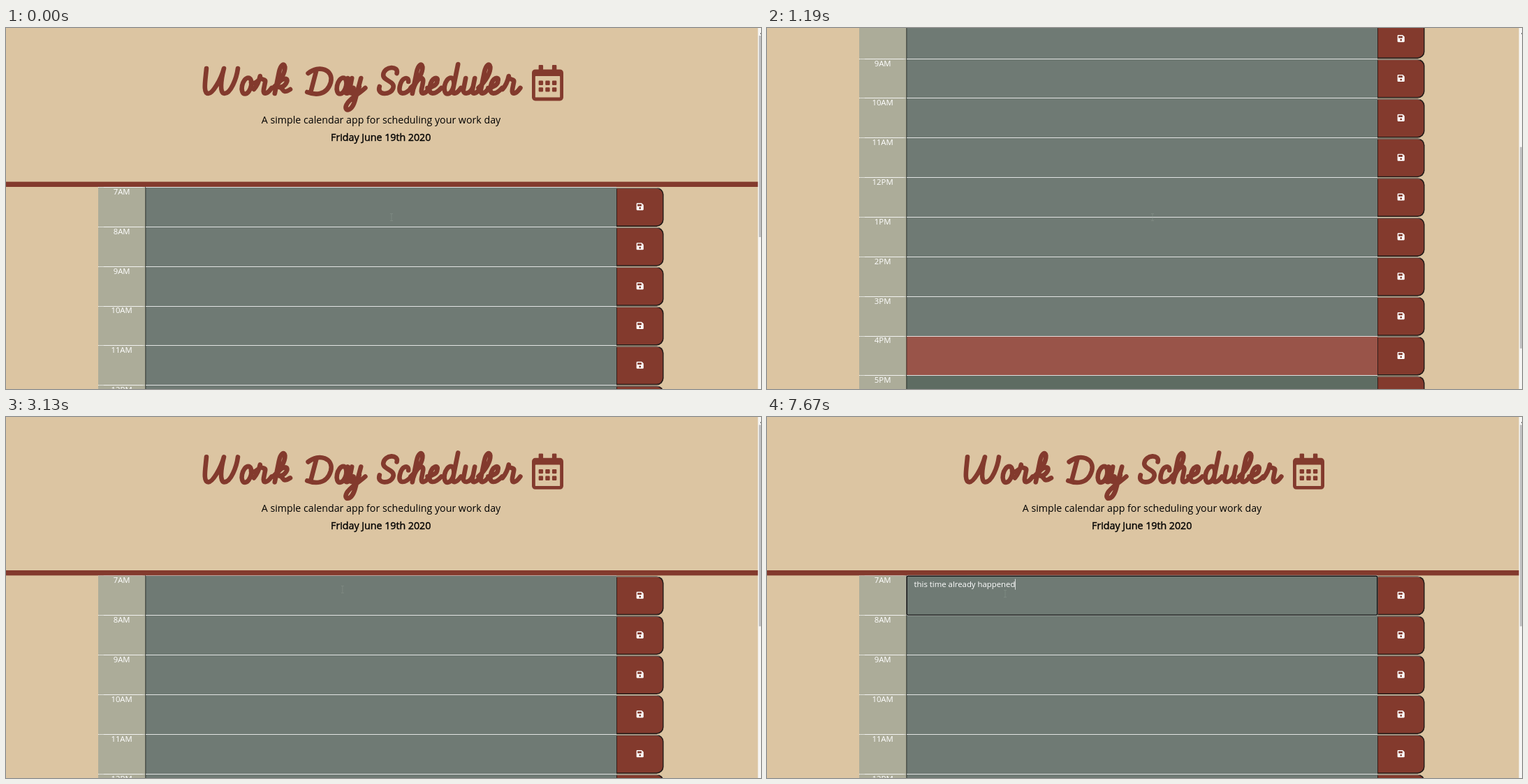
These frames come from a looping animation (1081x518 px, 8 s). An HTML page with a canvas:

```html
<!DOCTYPE html>
<html lang="en">
<head>
<meta charset="utf-8">
<title>Work Day Scheduler</title>
<style>
html, body { margin: 0; width: 100%; height: 100%; overflow: hidden; background: #dcc5a2; }
canvas { display: block; width: 1081px; height: 518px; }
</style>
</head>
<body>
<canvas id="stage" role="img" aria-label="Work Day Scheduler"></canvas>
<script>
const W = 1081, H = 518, LOOP = 8000;
const ROW = 56.85, TOP = 228.5, ROWS = 13, CURRENT = 9;
const RUST = '#833a2d', SAND = '#dcc5a2';
const NOTE = 'this time already happened';
const FOCUS = 3940;
const canvas = document.getElementById('stage');
const ctx = canvas.getContext('2d');
const dpr = window.devicePixelRatio || 1;
canvas.width = W * dpr;
canvas.height = H * dpr;

const STEP = 137.5;
const bursts = [[500, 1460], [1860, 1980], [2720, 3690], [3810, 4080],
  [4510, 5480], [5630, 6030], [6450, 7120], [7530, 7670]];

function snap(t) {
  const burst = bursts.findLast(b => b[0] <= t);
  if (!burst) return 0;
  const [start, end] = burst;
  const step = (end - start) / Math.round((end - start) / STEP);
  return Math.min(end, start + Math.floor((t - start + 12) / step) * step);
}

// Linear motion through [time, value] points, held at both ends.
function along(t, ...points) {
  const i = points.findIndex(p => p[0] > t);
  if (i === 0) return points[0][1];
  if (i < 0) return points.at(-1)[1];
  const [[t0, a], [t1, b]] = [points[i - 1], points[i]];
  return a + (b - a) * (t - t0) / (t1 - t0);
}

const scrollAt = t => along(t, [478, 0], [1322, 355.5], [1780, 355.5], [1980, 427.4], [2600, 427.4], [3130, 0.6]);
const typedAt = t => Math.ceil(along(t, [4340, 0], [5480, 12], [6030, 18], [6316, 18], [7120, 25], [7670, 26]));
const pointerAt = t => [
  along(t, [2720, 552], [3130, 483], [3810, 341]),
  along(t, [2720, 271], [3130, 247], [3810, 253])
];

// Script lettering from a few shared pen strokes, slanted as a whole.
const SLANT = 0.2;
const flick = x => `C${x} -2 ${x + 6} -2 ${x + 11} -12`;
const stem = (x, top) => `M${x} ${top}V-10${flick(x)}`;
const bowl = 'M16 -15a6.5 11.5 0 1 0 -13 0a6.5 11.5 0 1 0 13 0';
const cup = 'M3 -26V-10C3 -2 14 -2 16 -14';
const curl = 'C13 -29 3 -28 3 -14C3 -1 13 -2 20 -12';
const loop = 'M0 -12C9 -22 13 -34 11 -42C9 -48 4 -46 4 -34V-10';

// Each letter has its advance and its strokes.
const glyphs = {
  W: [51, 'M-2 -40C0 -22 0 -4 8 -4C14 -4 22 -24 23 -40C22 -22 24 -4 31 -4C40 -4 44 -26 43 -40'],
  D: [41, 'M3 -6C14 -2 32 0 34 -20C35 -38 12 -46 -1 -33M10 -38L8 -5'],
  S: [29, 'M24 -33C25 -44 4 -44 5 -31C6 -22 24 -22 23 -12C22 -1 1 -1 3 -14'],
  a: [19, bowl + stem(16, -26)],
  c: [19, 'M14 -21' + curl],
  d: [28, bowl + stem(16, -46)],
  e: [21, 'M0 -12C8 -13 13 -17 12 -22' + curl],
  h: [24, loop + 'V-4M4 -10C6 -28 16 -30 16 -20' + stem(16, -20)],
  k: [28, loop + 'V-4M4 -14C8 -28 22 -28 17 -18C15 -14 11 -13 9 -13C16 -12 14 -2 25 -10'],
  l: [14, loop + flick(4)],
  o: [21, bowl + 'M15 -20Q20 -17 24 -22'],
  r: [27, 'M0 -10Q5 -18 5 -29C6 -22 14 -26 14 -21' + stem(14, -21)],
  u: [24, cup + stem(16, -26)],
  y: [24, cup + 'M16 -26L14 4C13 24 0 22 3 12C5 4 16 -2 25 -12']
};

function lettering() {
  const path = new Path2D();
  for (const [word, left] of [['Work', 281], ['Day', 427], ['Scheduler', 529]]) {
    let x = left;
    for (const ch of word) {
      const [advance, strokes] = glyphs[ch];
      path.addPath(new Path2D(strokes), new DOMMatrix([1, 0, -SLANT, 1, x, 0]));
      x += advance;
    }
  }
  return path;
}

function calendarIcon() {
  const p = new Path2D();
  p.roundRect(0, 64, 448, 448, 48);
  p.roundRect(48, 160, 352, 304, 6);
  for (const x of [96, 288]) p.roundRect(x, 0, 64, 64, [12, 12, 0, 0]);
  for (const y of [224, 320])
    for (const x of [96, 192, 288]) p.roundRect(x, y, 64, 64, 12);
  return p;
}

function saveIcon() {
  const p = new Path2D('M434 130 350 46Q336 32 316 32H48Q0 32 0 80V432Q0 480 48 480H400Q448 480 448 432V164Q448 144 434 130Z');
  p.roundRect(64, 96, 256, 128, 12);
  p.moveTo(288, 352);
  p.arc(224, 352, 64, 0, 7);
  return p;
}

const title = lettering(), calendar = calendarIcon(), disk = saveIcon();

function rect(x, y, w, h, color) {
  ctx.fillStyle = color;
  ctx.fillRect(x, y, w, h);
}

function box(x, y, w, h, r) {
  ctx.beginPath();
  ctx.roundRect(x, y, w, h, r);
}

function outline(color, width) {
  ctx.strokeStyle = color;
  ctx.lineWidth = width;
  ctx.stroke();
}

function text(str, x, y, size, color, align = 'center') {
  ctx.font = `400 ${size}px "Open Sans", sans-serif`;
  ctx.textAlign = align;
  ctx.fillStyle = color;
  ctx.fillText(str, x, y);
}

function icon(path, x, y, scale, color) {
  ctx.save();
  ctx.translate(x, y);
  ctx.scale(scale, scale);
  ctx.fillStyle = color;
  ctx.fill(path, 'evenodd');
  ctx.restore();
}

function header() {
  ctx.save();
  ctx.translate(0, 98);
  ctx.strokeStyle = RUST;
  ctx.lineWidth = 6.6;
  ctx.lineCap = ctx.lineJoin = 'round';
  ctx.stroke(title);
  ctx.restore();
  icon(calendar, 753, 53, 0.1004, RUST);
  text('A simple calendar app for scheduling your work day', 537, 136.5, 14.21, '#000');
  const date = 'Friday June 19th 2020';
  text(date, 536.7, 162, 14.21, '#000');
  ctx.strokeStyle = '#000';
  ctx.lineWidth = 0.4;
  ctx.strokeText(date, 536.7, 162);
  rect(0, 220.6, 1077, 7.4, RUST);
}

function button(y) {
  const h = ROW - 0.9;
  box(874, y, 67.6, h, [0, 10, 10, 0]);
  ctx.fillStyle = '#211a18';
  ctx.fill();
  ctx.save();
  ctx.clip();
  rect(874, y, 64, 1.4, '#9a9187');
  ctx.restore();
  box(874.8, y + 1.4, 65.4, h - 2.9, [0, 9, 9, 0]);
  ctx.fillStyle = RUST;
  ctx.fill();
  icon(disk, 902.7, y + 21.6, 0.0226, '#fff');
}

function row(i, scroll) {
  const y = TOP + i * ROW - scroll, line = Math.floor(y), hour = i + 7;
  const fill = i < CURRENT ? '#6f7a74' : i === CURRENT ? '#995449' : '#5e6c62';
  rect(132, line, 67.5, 58, '#acac99');
  rect(199.5, line, 674.5, 58, fill);
  rect(199.5, line, 0.8, 58, '#1b201d');
  button(y + 0.5);
  rect(200, line, 674, 1, 'rgba(255,255,255,.8)');
  for (let x = 132; x < 199; x += 2.1) rect(x, line, 1.3, 1, '#fff');
  rect(140, line, 56, 1, 'rgba(255,255,255,.6)');
  text((hour > 12 ? hour - 12 : hour) + (hour < 12 ? 'AM' : 'PM'), 165.6, y + 10.4, 11.37, '#fff');
}

function entry(str) {
  box(199.3, TOP - 0.6, 675.2, 57.6, 2);
  outline('rgba(255,255,255,.6)', 0.7);
  box(200.2, TOP + 0.3, 673.6, 55.9, 1.5);
  outline('#101010', 1.4);
  text(str, 210.6, 244.9, 11.37, '#fff', 'left');
  rect(Math.floor(210.6 + ctx.measureText(str).width), 233, 1, 15.4, '#d5d8d6');
}

function iBeam([x, y]) {
  ctx.globalAlpha = 0.35;
  rect(x - 0.5, y - 4, 1, 9, '#98a098');
  for (const end of [-5, 5]) rect(x - 2, y + end, 4, 1, '#98a098');
  ctx.globalAlpha = 1;
}

function scrollbar(scroll) {
  rect(1076.6, 0, 5, H, '#f6f5f3');
  rect(1078, 11 + scroll * 0.536, 3, 289, '#c1c1c1');
  rect(1080, 7, 1, 2, '#777');
}

function draw(t) {
  const s = snap(t), scroll = scrollAt(s);
  ctx.setTransform(dpr, 0, 0, dpr, 0, 0);
  rect(0, 0, W, H, SAND);
  for (let i = 0; i < ROWS; i++) row(i, scroll);
  ctx.save();
  ctx.translate(0, -scroll);
  header();
  if (s >= FOCUS) entry(NOTE.slice(0, typedAt(s)));
  ctx.restore();
  iBeam(pointerAt(s));
  scrollbar(scroll);
}

const start = performance.now();
function tick() {
  draw((performance.now() - start) % LOOP);
  requestAnimationFrame(tick);
}
tick();
</script>
</body>
</html>
```
